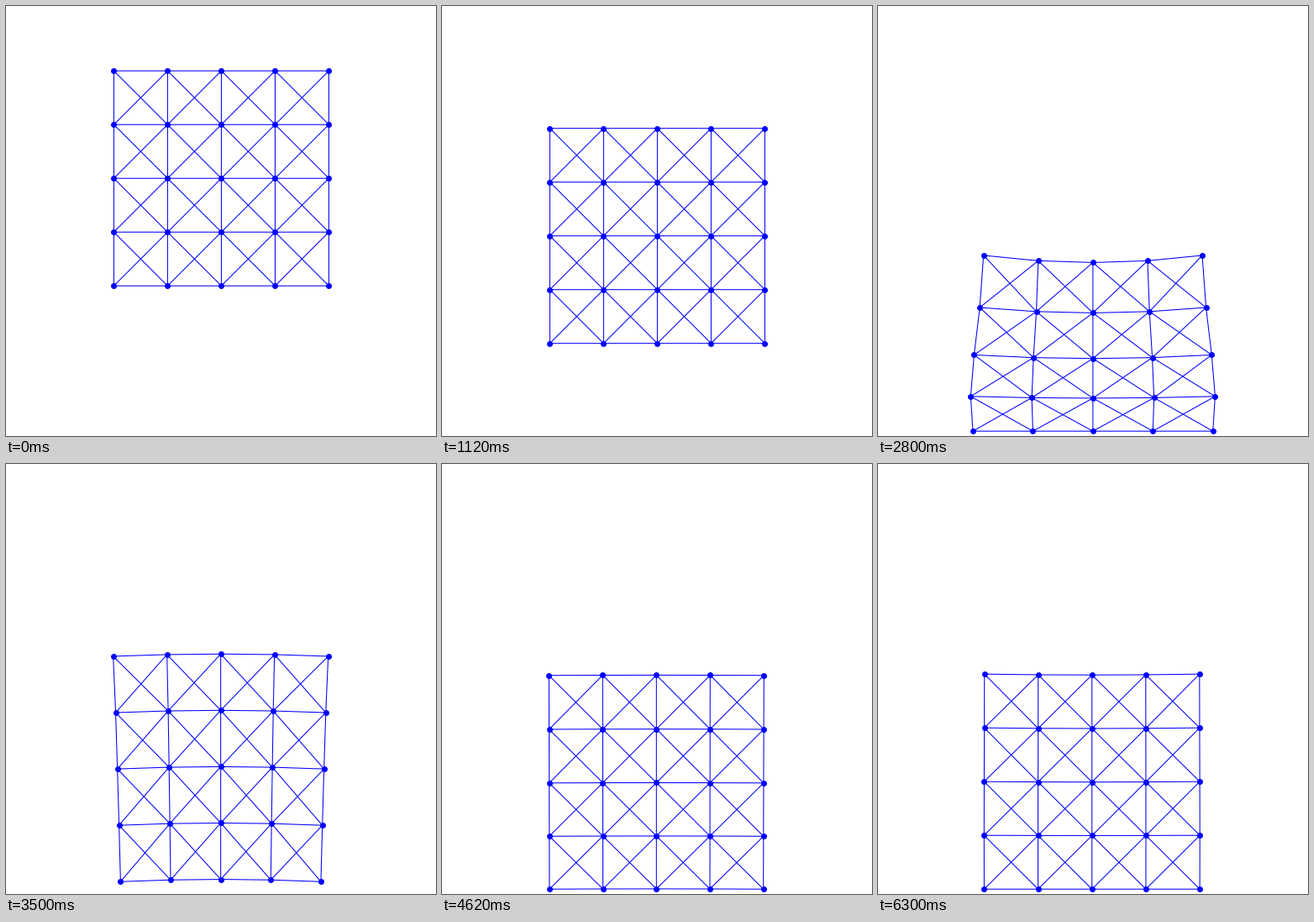
Recreate the animation shown at these times as a matplotlib script. Size 512 by 512 pixels, loop 6370 ms.

```python
import numpy as np
import matplotlib.pyplot as plt
from matplotlib.animation import FuncAnimation
from matplotlib.collections import LineCollection

SIZE, DPI = 512, 100
FRAMES, INTERVAL = 91, 70
N, SIDE = 5, 256
FLOOR = 506.2
PULL = 0.2253          # half the gravity, in px per frame squared
PX = 72 / DPI
BLUE = "#0000ff"

u = np.linspace(-1, 1, N)      # across the block
s = np.linspace(1, 0, N)       # height in the block, top row first

BULGE = np.exp(-((s - 0.22) / 0.54) ** 2)   # a squeezed block is widest near the floor
TAPER = (1 - s) ** 0.8                      # a ringing block swings most at its foot


def wave(t, amp, decay, omega):
    """Damped sine that starts at t = 0."""
    return amp * np.exp(-decay * t) * np.sin(omega * t) if t > 0 else 0.0


def first_hit(t):
    return max(0.0, wave(t - 26.3, 87.6, 0.03, 0.161))


def second_hit(t):
    return max(0.0, wave(t - 66, 37, 0.04, 0.132))


def hits(t):
    return first_hit(t) + second_hit(t)


def ring(t):
    """Stretching that goes on in the air after the first bounce."""
    return wave(t - 45.8, 20, 0.114, 0.349)


def base(t):
    """Height of the bottom row: fall, hop, or rest on the floor."""
    drop = 332.7 + PULL * (t + 1.5) ** 2
    hop = 355 + SIDE / 2 + PULL * (t - 56) ** 2 + ring(t) / 2
    return min(FLOOR, drop, hop)


def pose(t):
    """Node positions, row by row."""
    sink = (first_hit(t) * (1 - (1 - s) ** 2.3)
            + second_hit(t) * (1 - (1 - s) ** 2)
            - ring(t) * s)
    # Sideways motion and bending follow the squeeze with a short lag.
    half = SIDE / 2 + 0.33 * hits(t - 1) * BULGE - 0.7 * ring(t - 1) * TAPER
    arch = 0.22 * ring(t) - 0.13 * hits(t - 4) * s
    cx = 256.4 - 0.022 * max(0, t - 16)

    x = cx + np.outer(half, u)
    y = (base(t) - SIDE * s + sink)[:, None] - np.outer(arch, 1 - u ** 2)
    return np.column_stack([x.ravel(), np.minimum(y, FLOOR).ravel()])


def make_springs():
    links = []
    for r in range(N):
        for c in range(N):
            for dr, dc in ((0, 1), (1, 0), (1, 1), (1, -1)):
                if r + dr < N and 0 <= c + dc < N:
                    links.append((r * N + c, (r + dr) * N + c + dc))
    return np.array(links)


springs = make_springs()

fig = plt.figure(figsize=(SIZE / DPI, SIZE / DPI), dpi=DPI, facecolor="white")
ax = fig.add_axes([0, 0, 1, 1])
ax.set_xlim(0, SIZE)
ax.set_ylim(SIZE, 0)
ax.axis("off")

start = pose(0)
lines = LineCollection(start[springs], colors=BLUE, linewidths=1.05 * PX, snap=False)
ax.add_collection(lines, autolim=False)
dots = ax.scatter(start[:, 0], start[:, 1], s=(7 * PX) ** 2, color=BLUE,
                  linewidths=0, snap=False, zorder=3)


def update(frame):
    nodes = pose(frame)
    lines.set_segments(nodes[springs])
    dots.set_offsets(nodes)
    return lines, dots


anim = FuncAnimation(fig, update, frames=FRAMES, interval=INTERVAL,
                     repeat=True, repeat_delay=0, blit=False)
plt.show()
```
